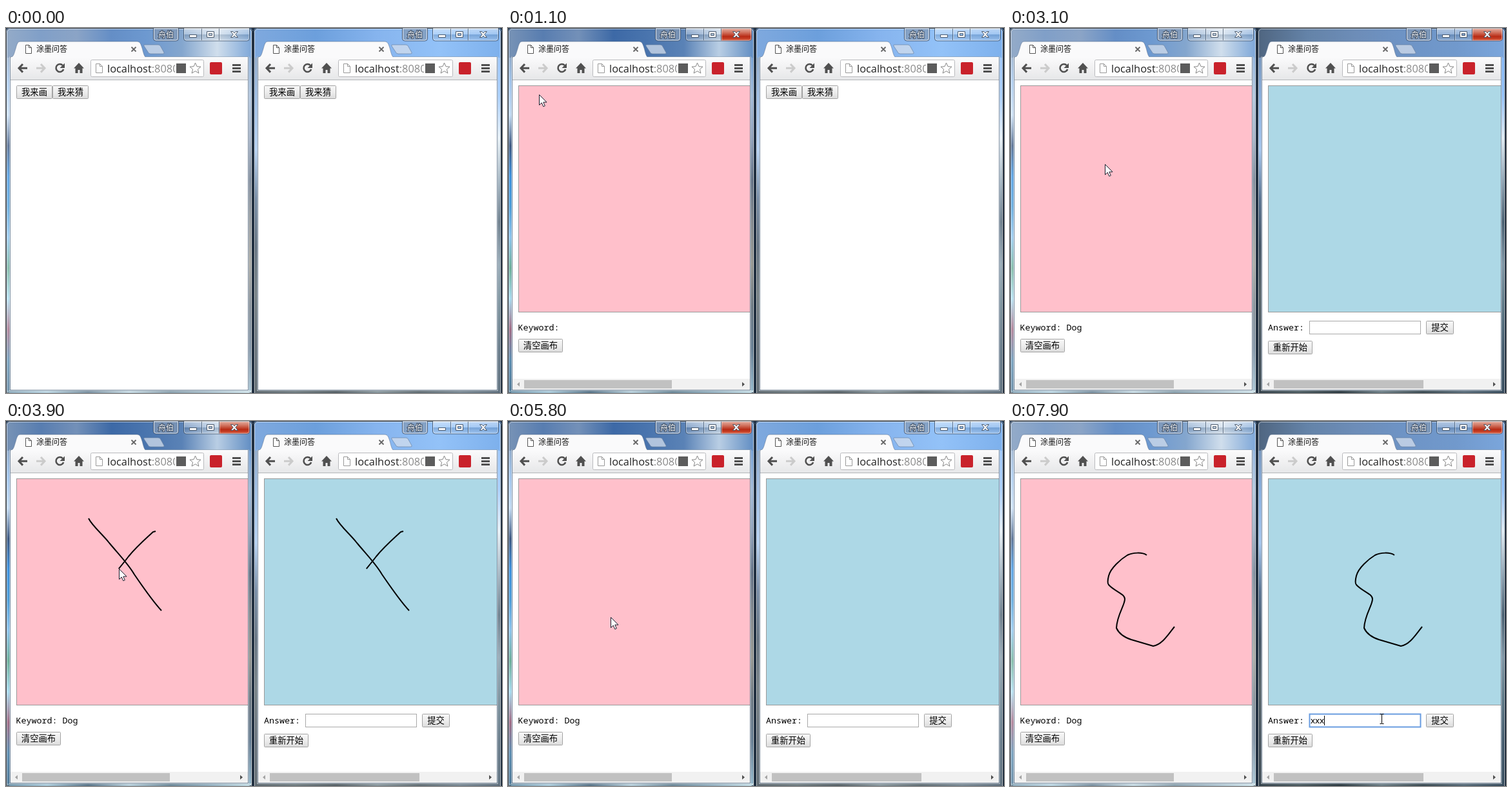
An HTML page that plays this animation: 769 px wide and 566 px high, repeating every 8000 ms.

```html
<!DOCTYPE html>
<html lang="zh-CN">
<head>
<meta charset="utf-8">
<title>涂墨问答</title>
<style>
html, body { margin: 0; width: 100%; height: 100%; overflow: hidden; background: #1f2f42; }
svg { display: block; width: 769px; height: 566px; }
text { font-family: "Noto Sans CJK SC", "Noto Sans CJK", sans-serif; white-space: pre; }
.tab { font-size: 12px; fill: #111; }
.user { font-size: 12px; fill: #fff; stroke: #3a4c64; stroke-width: 2px; paint-order: stroke; }
.url { font: 16.4px "Open Sans", "Noto Sans", sans-serif; }
.mono { font: 13.333px "Noto Sans Mono", "Liberation Mono", monospace; }
.typed { font: 13.333px "Noto Sans", "Open Sans", sans-serif; }
.btn text { font-size: 13.333px; }
.btn rect { fill: url(#face); stroke: #a3a3a3; }
.btn.hover rect { stroke: #6e6e6e; }
.line { fill: none; }
.ink { fill: none; stroke: #000; stroke-width: 2; stroke-linejoin: round; }
.off { display: none; }
</style>
</head>
<body>
<svg id="stage" viewBox="0 0 769 566" xmlns="http://www.w3.org/2000/svg"></svg>
<script>
const LOOP = 8000, STEP = 100, CLEARED = 5400;

// pen strokes: start, end, path
const strokes = [
  [3200, 3600, 'M128 151C134 163 150 176 160 189C175 207 190 222 199 238C214 260 228 280 241 294'],
  [3800, 4000, 'M232 171L228 172C215 184 203 194 190 210C175 230 160 245 146 266C139 275 131 285 126 295'],
  [4200, 4450, 'M95 197C97 204 110 219 117 230C128 247 140 260 152 275C172 297 190 322 215 344C228 357 244 368 254 375'],
  [4600, 4800, 'M262 236L259 237C250 252 238 265 228 277C215 293 205 305 192 322C182 334 172 344 165 358'],
  [5900, 6600, 'M212 208C205 203 190 204 182 208C172 214 156 228 153 240C151 248 151 252 153 254C162 264 178 268 178 276C178 286 166 300 165 321C168 328 176 335 188 339L222 349C236 347 246 330 255 319'],
];

// pointer stops: time, x, y
const stops = [
  [200, 551, 107], [900, 48, 103], [1100, 48, 103], [1300, 70, 430], [1400, 72, 540],
  [1500, 190, 330], [1600, 424, 137], [1700, 472, 126], [1800, 485, 113], [1900, 494, 102],
  [2300, 494, 102], [3100, 147, 211], [3200, 128, 151], [3600, 241, 294], [3800, 232, 171],
  [4000, 126, 295], [4200, 95, 197], [4450, 254, 375], [4600, 262, 236], [4800, 165, 358],
  [4900, 145, 385], [5100, 60, 478], [5200, 52, 497], [5600, 52, 497], [5900, 212, 208],
  [6600, 255, 319], [6700, 397, 390], [7000, 575, 462], [7100, 576, 462], [LOOP, 576, 462],
];

const grad = (id, colors, across) =>
  `<linearGradient id="${id}" x2="${across ? 1 : 0}" y2="${across ? 0 : 1}">` +
  colors.split(' ').map((c, i, a) => `<stop offset="${i / (a.length - 1)}" stop-color="${c}"/>`).join('') +
  '</linearGradient>';

const rect = (x, y, w, h, attrs) => `<rect x="${x}" y="${y}" width="${w}" height="${h}" ${attrs}/>`;

const button = (id, x, y, w, label) =>
  `<g class="btn" id="${id}">${rect(x + .5, y + .5, w - 1, 20, 'rx="1"')}` +
  `<text x="${x + w / 2}" y="${y + 15}" text-anchor="middle">${label}</text></g>`;

const sheet = (x, y, w, h, color) =>
  `<path d="M${x} ${y}h${w - 4}l4 4v${h - 4}h${-w}zM${x + w - 4} ${y}v4h4" fill="#fff" stroke="${color}"/>`;

const scrollbar = r => `${rect(7, 544, 368 + r, 17, 'fill="#f1f1f1"')}
  ${rect(25, 546, 229 + r * 1.5, 13, 'fill="#c1c1c1"')}
  <path d="M18 549v7l-4-3.5z" fill="#a3a3a3"/><path d="M${363 + r} 549v7l4-3.5z" fill="#505050"/>`;

const canvas = (color, r) => rect(16.5, 89.5, 400 + r, 351, `fill="${color}" stroke="#999"`) +
  strokes.map(s => `<path class="ink" d="${s[2]}"/>`).join('');

// r: how much wider the window is than the narrow one
function chrome(id, x, r, page) {
  const w = 382 + r;
  const titleBar = `M0 46V6Q0 0 6 0H${w - 6}Q${w} 0 ${w} 6V46z`;
  return `<g transform="translate(${x})">
  <clipPath id="${id}Body">${rect(7, 81, 368 + r, 480, '')}</clipPath>
  <clipPath id="${id}Url">${rect(150, 50, 112 + r, 26, '')}</clipPath>
  ${rect(0, 0, w, 566, `rx="6" fill="url(#${id}Low)"`)}
  ${rect(0, 40, 8, 522, `fill="url(#${id}Edge)"`)}
  ${rect(w - 8, 40, 8, 522, `fill="url(#${id}Far)"`)}
  <path d="${titleBar}" fill="url(#${id}Top)"/>
  <g id="${id}Pale">
    ${rect(0, 46, w, 520, 'fill="#fff" opacity=".2"')}
    <path d="${titleBar}" fill="url(#${id}Light)"/>
  </g>
  ${rect(.5, .5, w - 1, 572, 'class="line" rx="6" stroke="#26323f"')}
  ${rect(1.5, 1.5, w - 3, 570, 'class="line" rx="5" stroke="#fff" stroke-opacity=".6"')}
  ${rect(5.5, 45, 371 + r, 517.5, 'class="line" stroke="#fff" stroke-opacity=".5"')}
  ${rect(6.5, 45, 369 + r, 516.5, 'fill="#fff" stroke="#52677f" stroke-opacity=".7"')}
  <path d="M215 26h21q3 0 4 3l5 9q1 2-2 2h-19q-3 0-4-3l-6-9q-1-2 1-2z" fill="#d3deed" fill-opacity=".75" stroke="#60799a" stroke-opacity=".6"/>
  ${rect(7, 45, 368 + r, 35, 'fill="url(#bar)"')}
  ${rect(7, 80, 368 + r, 1, 'fill="#b4b6b9"')}
  <path d="M7 46C12 45 13 38 15 32C17 25 18 21 22 21H203C208 21 209 25 211 31C213 38 214 45 218 46" fill="#fafafb" stroke="#5b7290" stroke-opacity=".55"/>
  ${rect(8, 45, 366 + r, 2, 'fill="#fafafb"')}
  ${sheet(30.5, 26.5, 9, 13, '#555')}
  <text class="tab" x="47" y="37">涂墨问答</text>
  <path d="M194.5 29.5l7 7m0-7l-7 7" stroke="#666" stroke-width="1.8"/>
  <g class="line" stroke-width="3">
    <path d="M26 56l-6 6.3 6 6.3M20 62.3h13" stroke="#505050"/>
    <path d="M54 56l6 6.3-6 6.3M60 62.3H47" stroke="#cbcbcb"/>
    <path d="M88 58a6 6 0 1 0 1.2 6" stroke="#505050" stroke-width="2.6"/>
    <path d="M${351 + r} 57.5h13m-13 5h13m-13 5h13" stroke="#505050"/>
  </g>
  <path d="M91 54.5v7.5h-7.5z" fill="#505050"/>
  <path d="M113 54l8 8.5h-2.5V70h-4v-5h-3v5h-4v-7.5H105z" fill="#505050"/>
  ${rect(131.5, 49.5, 175 + r, 26, 'rx="2" fill="#fff" stroke="#b9babd"')}
  ${sheet(139.5, 55.5, 10, 14, '#999')}
  <g clip-path="url(#${id}Url)"><text class="url" x="157" y="69" fill="#222">localhost<tspan fill="#8a8a8a">:8080</tspan></text></g>
  ${rect(264 + r, 55, 15, 15, 'fill="#5c5c5c"')}
  <path transform="translate(${293.5 + r} 62.5)" d="M0-8.5L2.5-2.8 8.5-2.4 3.9 1.6 5.4 7.6 0 4.3-5.4 7.6-3.9 1.6-8.5-2.4-2.5-2.8z" fill="#fff" stroke="#858585"/>
  ${rect(316 + r, 53, 19, 19, 'rx="2" fill="#c9222b"')}
  <g transform="translate(${r})">
    <path d="M228.5 0V16q0 4 4 4h31q4 0 4-4V0" fill="#8299b6" fill-opacity=".75" stroke="#3d5270"/>
    <path d="M229.5 1V16q0 3 3 3h31q3 0 3-3V1z" class="line" stroke="#fff" stroke-opacity=".75"/>
    <text class="user" x="248" y="15" text-anchor="middle">舟伯</text>
    <path d="M275.5 0V16q0 4 4 4h94q4 0 4-4V0" fill="url(#glass)" stroke="#33475f" stroke-opacity=".8"/>
    <path id="${id}Close" d="M330.5 1V19.5h43q4 0 4-4V1z" fill="url(#red)"/>
    <path d="M276.5 1V16q0 3 3 3h94q3 0 3-3V1zM304.5 1v18M331.5 1v18" class="line" stroke="#fff" stroke-opacity=".45"/>
    <path d="M303.5 1v18M330.5 1v18" stroke="#33475f" stroke-opacity=".7"/>
    <g fill="#fff" stroke="#3d4c60" stroke-width=".9">
      <path d="M284.5 10.5h11v4h-11z"/>
      <path fill-rule="evenodd" d="M311.5 5.5h11v9h-11zM314.5 8.5h5v3h-5z"/>
      <path d="M348.5 5.5h3.5l2 2.4 2-2.4h3.5l-3.7 4.5 3.7 4.5h-3.5l-2-2.4-2 2.4h-3.5l3.7-4.5z"/>
    </g>
  </g>
  <g clip-path="url(#${id}Body)">
    <g id="${id}Menu">${button(id + 'Draw', 16, 89, 56, '我来画')}${button(id + 'Guess', 72, 89, 56, '我来猜')}</g>
    <g id="${id}Game">${page}${scrollbar(r)}</g>
  </g></g>`;
}

const drawPage = canvas('#ffc0cb', 0) +
  '<text class="mono" id="keyword" x="15.5" y="469"></text>' +
  button('clear', 16, 482, 69, '清空画布');

const guessPage = canvas('#add8e6', 2) +
  '<text class="mono" x="16" y="469">Answer:</text>' +
  rect(80.5, 454.5, 172, 20, 'id="field" fill="#fff" stroke="#a9a9a9"') +
  '<text class="typed" id="typed" x="82" y="469"></text>' +
  rect(0, 457, 1, 15, 'id="caret"') +
  button('send', 261, 454, 43, '提交') + button('again', 16, 485, 69, '重新开始');

const stage = document.getElementById('stage');
stage.innerHTML = `<defs>
  ${grad('aTop', '#7893b6 #587db0 #7390b8 #3d69a6 #4a75ae #5a82b6 #b9cee4 #5f8cc2', true)}
  ${grad('aLight', '#94abc8 #809fc8 #8ba4c6 #648ec6 #6d99d0 #84a6ce #d0deec #7ca6d8', true)}
  ${grad('bTop', '#4f6580 #6483a8 #6d8db8 #6e94c6 #7199cc #7ba6dc', true)}
  ${grad('bLight', '#7fa9de #6c9fdc #86b4ee #93c2f8 #7db0ec', true)}
  ${grad('aEdge', '#8fa9c8 #a2c6ee #c4dcf4 #3a5680 #3a90de #4a9cd8 #8cc4ee #6aae98 #a8dcf0 #a06a84 #5a8cb0 #4d7898')}
  ${grad('aFar', '#6d9ad0 #9ab4d2 #8a9cb6 #5c6c80 #7c8388 #8f918c #66737e #60788e #8cb0c4')}
  ${grad('aLow', '#6f93a8 #a8c8d8 #587488 #b4ccd8 #6c8898 #94b0c0 #c4dce4', true)}
  ${grad('bEdge', '#6c8cb4 #7fa9dc #9cc0ea #4c6888 #35485a #4c5a60 #3c4a55 #33414a')}
  ${grad('bFar', '#7cb0f0 #8cbcf4 #dce8f0 #8aa0b0 #41586a #7890a0 #54707f #3a5366 #2f4658')}
  ${grad('bLow', '#33414a #4a5a60 #2c3a42 #6a7c84 #3a4a52 #566a78 #34495a', true)}
  ${grad('bar', '#fafafb #f1f1f2 #e6e7e9')}
  ${grad('face', '#f8f8f8 #ededed #dcdcdc')}
  ${grad('red', '#e3ab9e #d0705c #b82a14 #d4573a')}
  <linearGradient id="glass" x2="0" y2="1"><stop stop-color="#fff" stop-opacity=".5"/><stop offset=".5" stop-color="#fff" stop-opacity=".25"/><stop offset=".5" stop-color="#345" stop-opacity=".15"/><stop offset="1" stop-color="#fff" stop-opacity=".25"/></linearGradient>
  </defs>
  ${chrome('a', 0, 0, drawPage)}
  ${chrome('b', 384, 2, guessPage)}
  <g id="pointer">
    <path id="arrow" d="M.5 .5V16.5L4.2 13L6.8 18.8L9.3 17.7L6.8 12.1H12z" fill="#fff" stroke="#1b1b2b"/>
    <path id="beam" class="line" d="M-3-7.5h2.5l.5 1 .5-1H3M0-7V7M-3 7.5h2.5l.5-1 .5 1H3" stroke="#000"/>
  </g>`;

const $ = id => document.getElementById(id);
const show = (id, on) => $(id).classList.toggle('off', !on);
const hover = (id, on) => $(id).classList.toggle('hover', on);
const within = (t, from, to) => t >= from && t < to;

const inks = [...document.querySelectorAll('.ink')].map((el, i) => {
  const [from, to] = strokes[i % strokes.length];
  return { el, from, to, len: el.getTotalLength() };
});

function pointerAt(t) {
  const pen = inks.find(k => within(t, k.from, k.to));
  if (pen) {
    const p = pen.el.getPointAtLength(pen.len * (t - pen.from) / (pen.to - pen.from));
    return [p.x, p.y];
  }
  const i = Math.max(1, stops.findIndex(s => s[0] > t));
  const [t0, x0, y0] = stops[i - 1], [t1, x1, y1] = stops[i];
  const k = (t - t0) / (t1 - t0);
  return [x0 + (x1 - x0) * k, y0 + (y1 - y0) * k];
}

function render(t) {
  const leftOn = within(t, 900, 2000) || within(t, 3200, 7100);
  const rightOn = within(t, 2000, 3200) || t >= 7100;
  show('aPale', !leftOn);
  show('aClose', leftOn);
  show('bPale', !rightOn);
  show('bClose', rightOn);

  show('aMenu', t < 1000);
  show('aGame', t >= 1000);
  show('bMenu', t < 2200);
  show('bGame', t >= 2200);
  $('keyword').textContent = 'Keyword: ' + (t < 1200 ? '' : t < 2200 ? 'Monkey' : 'Dog');
  hover('aDraw', within(t, 900, 1000));
  hover('bGuess', within(t, 1900, 2200));
  hover('clear', within(t, 5200, 5700));

  for (const { el, from, to, len } of inks) {
    const done = Math.min(1, (t - from) / (to - from));
    const on = done > 0 && (t < CLEARED || from > CLEARED);
    el.classList.toggle('off', !on);
    if (on) el.setAttribute('stroke-dasharray', `${len * done} ${len + 9}`);
  }

  const focus = t >= 7100;
  const count = t < 7600 ? 0 : t < 7800 ? 1 : t < 7900 ? 2 : 3;
  $('field').setAttribute('stroke', focus ? '#699ce0' : '#a9a9a9');
  $('field').setAttribute('stroke-width', focus ? 2 : 1);
  $('typed').textContent = 'x'.repeat(count);
  show('caret', focus);
  $('caret').setAttribute('x', 82 + count * 7);

  const [x, y] = pointerAt(t).map(Math.round);
  const overField = t > 6600 && within(x, 464, 638) && within(y, 454, 476);
  show('pointer', t >= 200);
  show('arrow', !overField);
  show('beam', overField);
  $('pointer').setAttribute('transform', `translate(${x + (overField ? .5 : 0)} ${y})`);
}

const start = performance.now();
(function tick() {
  const t = (performance.now() - start) % LOOP;
  render(Math.floor(t / STEP) * STEP);
  requestAnimationFrame(tick);
})();
</script>
</body>
</html>
```
